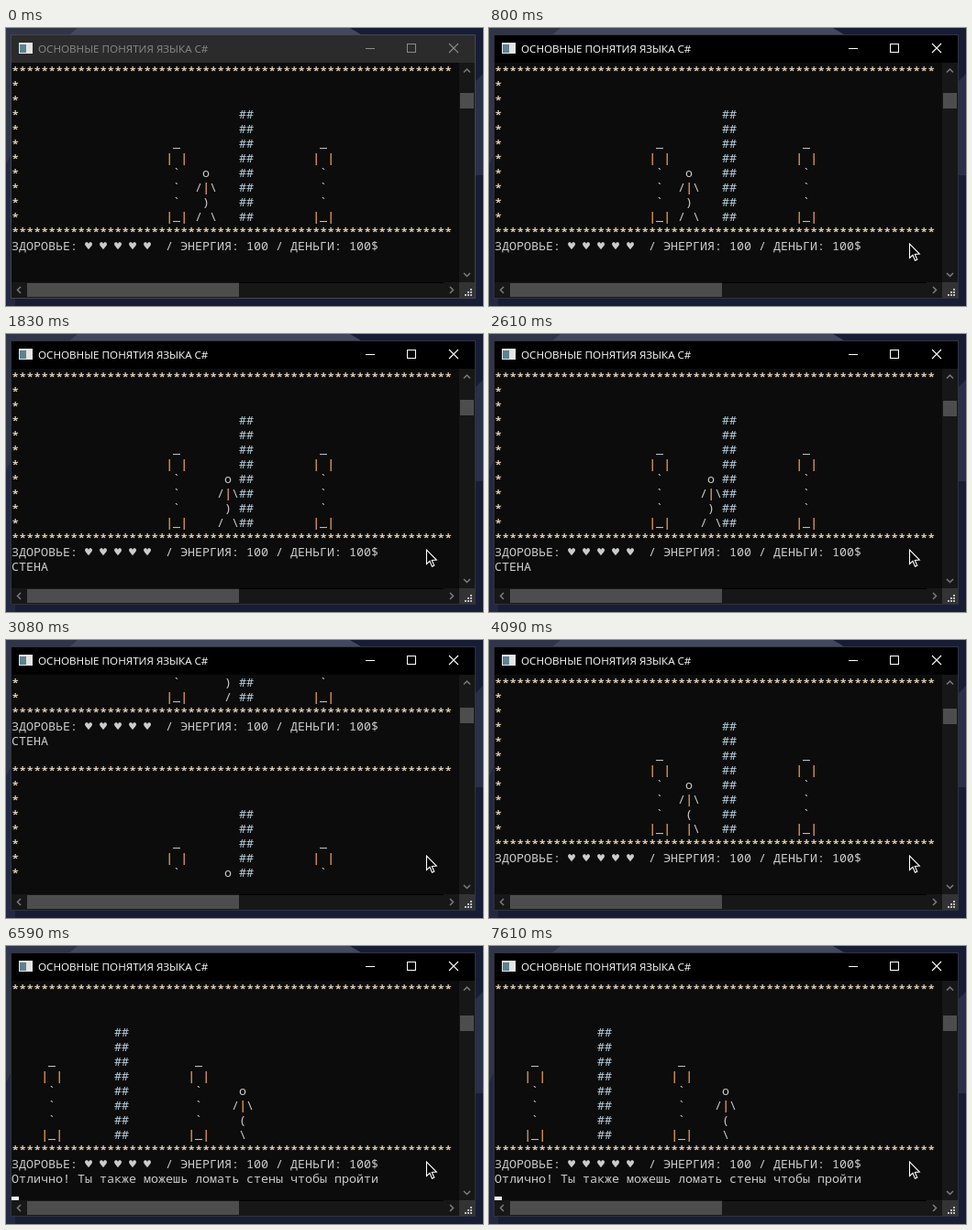
Recreate the animation shown at these times as an HTML page with a canvas. Size 520 px wide and 304 px high, loop 8 s.

```html
<!DOCTYPE html>
<html lang="ru">
<head>
<meta charset="utf-8">
<title>ОСНОВНЫЕ ПОНЯТИЯ ЯЗЫКА C#</title>
<style>
html, body { margin: 0; width: 100%; height: 100%; overflow: hidden; background: #181d36; }
canvas { display: block; }
</style>
</head>
<body>
<canvas id="stage" width="520" height="304"></canvas>
<script>
const ctx = document.getElementById('stage').getContext('2d');
const LOOP = 8000, X0 = 6, Y0 = 39, CW = 8, CH = 16, ROWS = 15;
const MONO = '13.33px "Noto Sans Mono", "DejaVu Sans Mono", monospace';
const STATS = 'ЗДОРОВЬЕ: ♥ ♥ ♥ ♥ ♥  / ЭНЕРГИЯ: 100 / ДЕНЬГИ: 100$';
const WALL = 'СТЕНА';
const DONE = 'Отлично! Ты можешь пройти';
const HINT = 'Отлично! Ты также можешь ломать стены чтобы пройти';
const FEET = {
  right: ['/ \\', '/| ', ' / '],
  left: ['/ \\', ' |\\', ' \\ ']
};

// glyph tint, colour fringe on the right edge, vertical nudge
const GLYPHS = {
  '*': { ink: '#dcdcd8', fringe: '#c58a4a', dy: 0.7 },
  '|': { ink: '#c98a4c', fringe: '#c98a4c', dy: 0 },
  '_': { ink: '#ccc', dy: -1 },
  '#': { ink: '#b9d0de', dy: 0 }
};
const PLAIN = { ink: '#ccc', dy: 0 };

// time, hero column, leg pose, scrollbar thumb, message, extras
const STEPS = [
  [0, 26, 0, 71, ''],
  [1200, 27, 1, 71, '', { scroll: 7 }],
  [1270, 27, 1, 71, ''],
  [1590, 28, 2, 71, ''],
  [1760, 29, 0, 72, WALL, { scroll: 6 }],
  [1830, 29, 0, 72, WALL],
  [2000, 29, 1, 72, WALL],
  [2300, 29, 2, 72, WALL, { torn: true }],
  [2380, 29, 2, 72, WALL],
  [2610, 29, 0, 73, WALL],
  [2780, 29, 1, 73, WALL],
  [2930, 29, 2, 73, WALL],
  [3080, 29, 0, 74, WALL, { scroll: 6 }],
  [3160, 29, 0, 74, WALL],
  [3310, 29, 1, 74, WALL],
  [3540, 28, 2, 74, '', { left: true }],
  [3710, 27, 0, 75, '', { left: true }],
  [4090, 26, 1, 75, '', { left: true }],
  [4410, 25, 2, 75, DONE, { left: true }],
  [5280, 31, 2, 76, HINT, { left: true, shift: 17 }]
];
const BLINKS = [5030, 6040, 6590, 7140, 7610];

function put(rows, row, col, text) {
  [...text].forEach((ch, i) => { if (ch !== ' ') rows[row][col + i] = ch; });
}

function room([, col, pose, , msg, { left = false, shift = 0 } = {}]) {
  const rows = Array.from({ length: ROWS }, () => []);
  const border = '*'.repeat(60);
  put(rows, 0, 0, border);
  put(rows, 11, 0, border);
  for (let r = 1; r < 11; r++) {
    if (!shift) put(rows, r, 0, '*');
    if (r > 2) put(rows, r, 31 - shift, '##');
  }
  for (const c of [21 - shift, 41 - shift]) {
    put(rows, 5, c, ' _');
    put(rows, 6, c, '| |');
    for (let r = 7; r < 10; r++) put(rows, r, c, ' `');
    put(rows, 10, c, '|_|');
  }
  put(rows, 7, col, 'o');
  put(rows, 8, col - 1, '/|\\');
  put(rows, 9, col, left ? '(' : ')');
  put(rows, 10, col - 1, FEET[left ? 'left' : 'right'][pose]);
  put(rows, 12, 0, STATS);
  put(rows, 13, 0, msg);
  return rows;
}

function screen(i) {
  const step = STEPS[i], { scroll, torn } = step[5] || {};
  const rows = room(step);
  if (scroll) {
    const prev = STEPS[i - 1], len = prev[4] ? 15 : 14;
    return [...room(prev).slice(len - scroll, len), ...rows].slice(0, 14);
  }
  if (torn) {
    for (let r = 1; r < 4; r++) rows[r] = [];
    put(rows, 1, 0, STATS);
    put(rows, 2, 0, WALL);
  }
  return rows;
}

function rect(color, x, y, w, h) {
  ctx.fillStyle = color;
  ctx.fillRect(x, y, w, h);
}

function poly(points) {
  ctx.beginPath();
  for (let i = 0; i < points.length; i += 2) ctx.lineTo(points[i], points[i + 1]);
}

function line(color, width, ...points) {
  poly(points);
  ctx.strokeStyle = color;
  ctx.lineWidth = width;
  ctx.stroke();
}

function shape(color, ...points) {
  poly(points);
  ctx.fillStyle = color;
  ctx.fill();
}

function drawDesktop() {
  rect('#181d36', 0, 0, 520, 304);
  shape('#303648', 0, 0, 80, 0, 70, 10, 10, 130, 0, 150);
  shape('#42485e', 78, 0, 375, 0, 392, 10, 66, 10);
  shape('#232942', 0, 150, 10, 130, 10, 304, 0, 304);
  shape('#2a3049', 510, 60, 520, 50, 520, 161, 510, 161);
}

function drawFrame(active) {
  rect(active ? '#30333c' : '#45464c', 5, 7, 507, 289);
  rect(active ? '#000' : '#2b2b2b', 6, 8, 505, 30);

  rect('#e4e4e4', 14, 16, 15, 12);
  rect('#5d8290', 15, 18, 7, 9);

  const ink = active ? '#fff' : '#8a8a8a';
  ctx.font = '11.65px "Open Sans", "Noto Sans", sans-serif';
  ctx.textAlign = 'left';
  ctx.fillStyle = ink;
  ctx.fillText('ОСНОВНЫЕ ПОНЯТИЯ ЯЗЫКА C#', 35, 27);

  rect(ink, 392, 22, 10, 1);
  ctx.strokeStyle = ink;
  ctx.lineWidth = 1;
  ctx.strokeRect(437.5, 17.5, 9, 9);
  line(ink, 1.1, 483, 17, 493, 27);
  line(ink, 1.1, 493, 17, 483, 27);
}

function drawBars(thumb) {
  rect('#171717', 494, 38, 17, 240);
  rect('#171717', 6, 278, 488, 17);
  rect('#000', 254, 278, 223, 1);
  rect('#4d4d4d', 495, thumb, 15, 17);
  rect('#4d4d4d', 23, 279, 231, 15);
  const gray = '#7c7c7c';
  line(gray, 1.5, 499, 48.5, 502.5, 45, 506, 48.5);
  line(gray, 1.5, 499, 268, 502.5, 271.5, 506, 268);
  line(gray, 1.5, 16, 283, 12.5, 286.5, 16, 290);
  line(gray, 1.5, 484, 283, 487.5, 286.5, 484, 290);
  rect('#333', 494, 278, 17, 17);
  for (let i = 0; i < 3; i++)
    for (let j = 0; j <= i; j++) rect('#bfbfbf', 506 - j * 3, 285 + i * 3, 2, 2);
}

function drawText(rows) {
  ctx.font = MONO;
  ctx.textAlign = 'center';
  rows.forEach((row, r) => row.forEach((ch, c) => {
    const { ink, fringe, dy } = GLYPHS[ch] || PLAIN;
    const x = X0 + c * CW + CW / 2, y = Y0 + r * CH + 12 + dy;
    if (fringe) {
      ctx.fillStyle = fringe;
      ctx.fillText(ch, x + 0.6, y);
    }
    ctx.fillStyle = ink;
    ctx.fillText(ch, x, y);
  }));
}

function drawPointer(t) {
  const p = Math.min(1, Math.floor((t - 500) / 75) / 4);
  const k = (1 - p) * (1 - p);
  ctx.save();
  ctx.translate(458 + 25 * k, 235.5 + 26 * k);
  poly([0.5, 0.5, 0.5, 16, 4, 12.8, 6.5, 18.7, 8.8, 17.7, 6.3, 11.9, 11.3, 11.6]);
  ctx.closePath();
  ctx.fillStyle = '#000';
  ctx.fill();
  ctx.strokeStyle = '#fff';
  ctx.lineWidth = 1.1;
  ctx.stroke();
  ctx.restore();
}

function draw(t) {
  const active = t >= 500;
  const i = STEPS.findLastIndex(s => s[0] <= t);
  drawDesktop();
  drawFrame(active);
  rect('#0c0c0c', 6, 38, 488, 240);
  drawText(screen(i));
  if (BLINKS.filter(b => b <= t).length % 2) rect('#f2f2f2', 6, 274, 8, 4);
  drawBars(STEPS[i][3]);
  if (active) drawPointer(t);
}

const start = performance.now();
function tick() {
  draw((performance.now() - start) % LOOP);
  requestAnimationFrame(tick);
}
tick();
</script>
</body>
</html>
```
